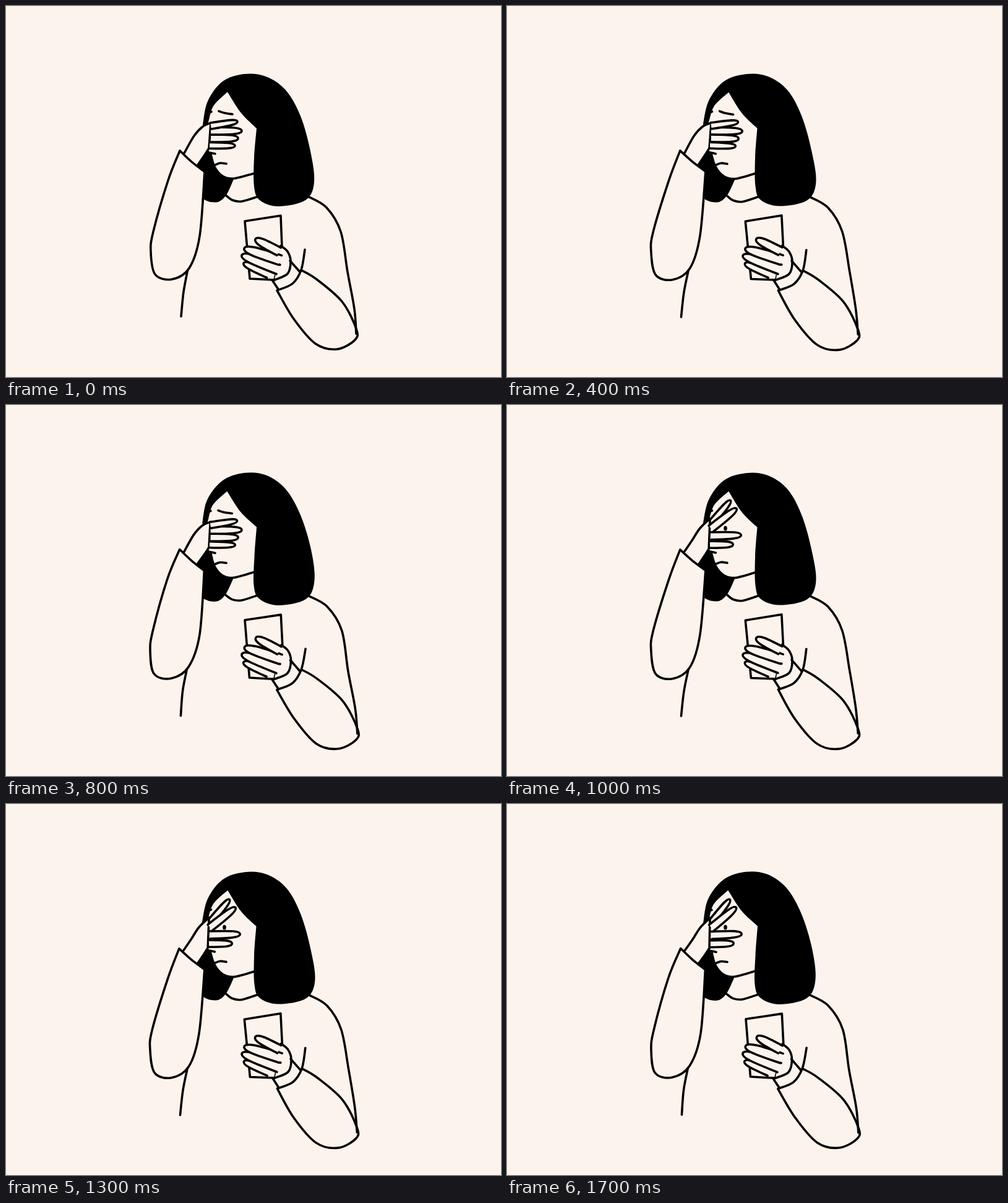
Write an HTML page with a canvas that moves like this. It is 800x600 px and loops after 1800 ms.

```html
<!DOCTYPE html>
<html lang="en">
<head>
<meta charset="utf-8">
<title>Facepalm</title>
<style>
  html, body { margin: 0; width: 100%; height: 100%; overflow: hidden; background: #fdf3ed; }
  canvas { display: block; width: 800px; height: 600px; }
</style>
</head>
<body>
<canvas id="stage" width="800" height="600"></canvas>
<script>
const ctx = document.getElementById("stage").getContext("2d");
const PAPER = "#fdf3ed", INK = "#000";
const LOOP = 1800, STEP = 100, OPEN_AT = LOOP / 2;
let boil = 0;

// Line boil: the redrawn lines swell slightly outwards and waver.
function warp([x, y]) {
  if (!boil) return [x, y];
  return [
    x + (x - 400) * 0.008 + 0.6 * Math.sin(y / 23 + boil * 2),
    y + Math.max(0, y - 400) * 0.01 + 0.5 * Math.sin(x / 19 + boil)
  ];
}

// Smooth curve through key points; "/" marks a corner.
function curve(text) {
  const path = new Path2D();
  let last = null;
  for (const run of text.split("/")) {
    const pts = run.trim().split(" ").map(s => warp(s.split(",").map(Number)));
    if (last) pts.unshift(last);
    else path.moveTo(...pts[0]);
    for (let i = 0; i < pts.length - 1; i++) {
      const a = pts[i], b = pts[i + 1];
      const before = pts[i - 1] || a, after = pts[i + 2] || b;
      path.bezierCurveTo(
        a[0] + (b[0] - before[0]) / 6, a[1] + (b[1] - before[1]) / 6,
        b[0] - (after[0] - a[0]) / 6, b[1] - (after[1] - a[1]) / 6,
        ...b);
    }
    last = pts[pts.length - 1];
  }
  return path;
}

function paint(path, color) {
  ctx.fillStyle = color;
  ctx.fill(path);
}

const line = text => ctx.stroke(curve(text));
const blot = text => paint(curve(text), INK);

function outline(text) {
  const path = curve(text);
  paint(path, PAPER);
  ctx.stroke(path);
}

// A rounded finger, open at its base; r is half its width.
function finger(baseX, baseY, tipX, tipY, r) {
  const dx = tipX - baseX, dy = tipY - baseY;
  const length = Math.hypot(dx, dy);
  const at = (along, side) => warp([
    baseX + dx * along + dy / length * r * side,
    baseY + dy * along - dx / length * r * side
  ]);
  const path = new Path2D();
  path.moveTo(...at(0, 1));
  path.bezierCurveTo(...at(0.6, 1), ...at(1, 1), ...at(1, 0));
  path.bezierCurveTo(...at(1, -1), ...at(0.6, -1), ...at(0, -1));
  paint(path, PAPER);
  ctx.stroke(path);
}

function head(open) {
  blot("327,232 308,258 / 320,268 / 320,313 / 331,317 345,316 357,304 368,280 / 354,277 337,260 327,232");
  blot("358,139 380,173 405,198 / 401,245 401,292 410,314 440,324 484,314 498,285 "
     + "492,235 476,178 452,136 420,114 385,110 350,122 326,154 318,192 / 326,190 335,162 358,139");
  line("331,240 337,260 350,275 368,279 400,271");
  line("328,237 338,239");
  line("338,257 346,254 356,255");
  line("327,173 332,171");
  line("355,306 366,314 381,316 408,308");
  if (open) {
    const eye = new Path2D();
    eye.ellipse(353, 199.5, 2.8, 4, 0, 0, Math.PI * 2);
    paint(eye, INK);
  } else {
    line("344,170 353,173 366,175");
  }
}

function raisedArm(open) {
  line("294,425 287,462 283,502");
  outline("321,268 300,252 281,234 / 262,282 238,365 234,398 241,434 268,442 296,424 313,372 321,268");
  if (open) {
    outline("288,237 300,220 313,200 329,184 / 327,233 / 320,244 311,257");
    finger(329, 226, 366, 225, 5.5);
    finger(333, 189, 361, 154, 5);
    finger(331, 200, 371, 167, 6);
    finger(331, 212, 379, 210, 6);
  } else {
    outline("288,238 304,210 318,195 331,189 / 328,230 / 321,241 310,257");
    finger(329, 225.5, 370, 226, 5);
    finger(331, 214, 375, 214, 6);
    finger(331, 202, 381, 202, 6);
    finger(331, 194, 374, 187, 5);
  }
}

function phoneArm() {
  line("488,308 518,326 541,365 552,430 563,490 566,530");
  line("483,394 477,427 463,449 438,460 / 465,506 500,546 535,555 564,540 566,522 543,478 502,442 477,427");
  line("386,348 444,339 / 446,390 / 434,443 / 394,441 / 386,348");
  outline("444,388 455,397 460,413 455,433 434,443");
  finger(424, 434, 384, 416, 6);
  finger(440, 426, 381, 403, 8);
  finger(443, 411, 385, 392, 8);
  finger(441, 397, 403, 377, 7);
  line("459,412 475,430");
  line("430,443 440,458");
}

function draw(time) {
  boil = Math.floor(time / STEP) % 3;
  const open = time >= OPEN_AT;
  ctx.fillStyle = PAPER;
  ctx.fillRect(0, 0, 800, 600);
  head(open);
  raisedArm(open);
  phoneArm();
}

ctx.strokeStyle = INK;
ctx.lineWidth = 3.6;
ctx.lineCap = ctx.lineJoin = "round";

const start = performance.now();
function tick() {
  draw((performance.now() - start) % LOOP);
  requestAnimationFrame(tick);
}
tick();
</script>
</body>
</html>
```
